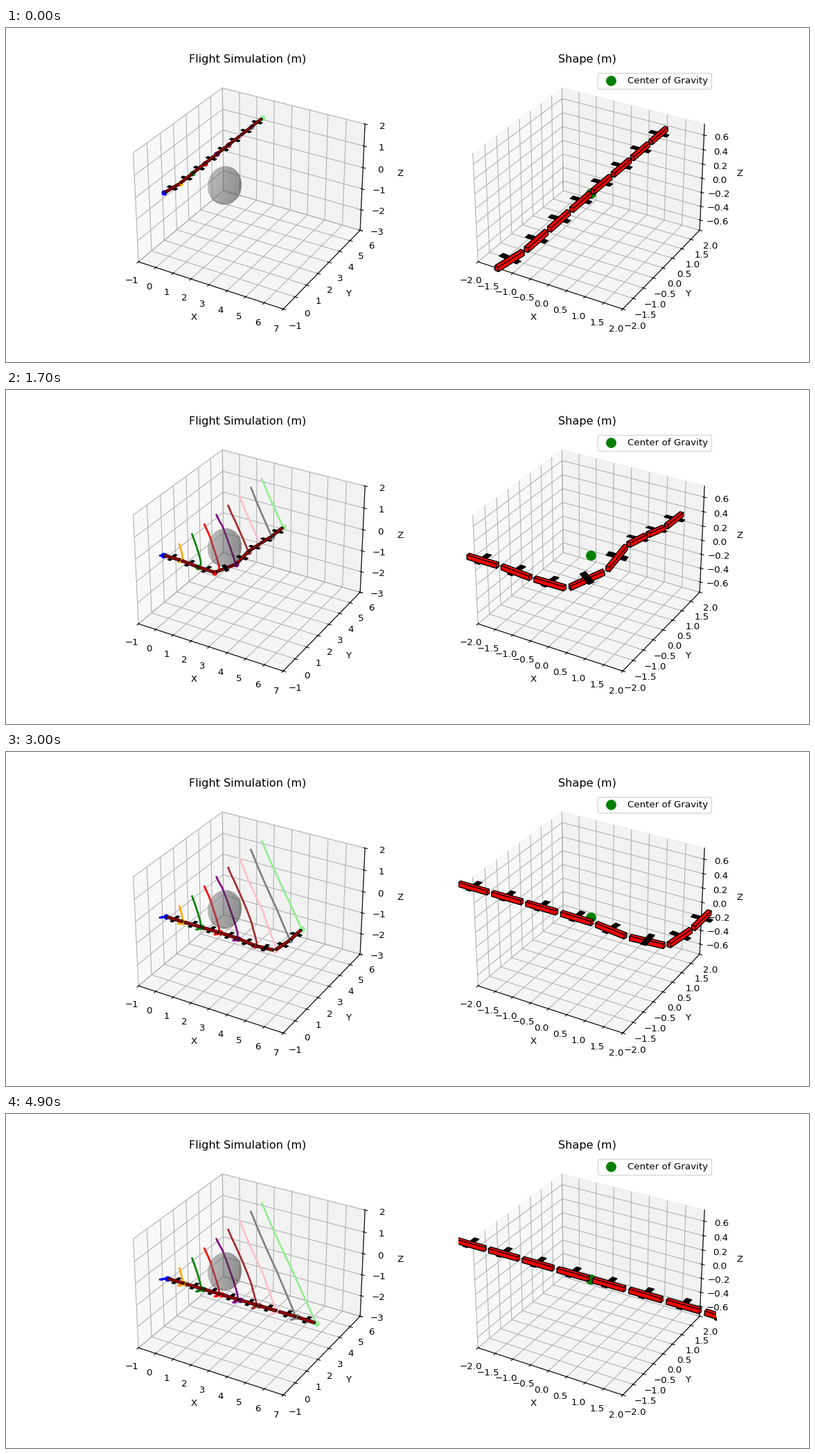
Recreate the animation shown at these times as a matplotlib script. Size 1159x483 px, loop 5 s.

```python
from itertools import product

import numpy as np
import matplotlib.pyplot as plt
from matplotlib.animation import FuncAnimation
from mpl_toolkits.mplot3d.art3d import Poly3DCollection

LINKS = 8
FRAMES = 50
START = -4          # trails begin a little before the first picture
STEP = 5            # frames between the turns of neighbouring links
COLORS = ["blue", "orange", "green", "red", "purple",
          "brown", "pink", "gray", "lightgreen"]
SIGHT = np.array([0.433, -0.75, 1.0])   # towards the viewer


def rise(t, mid, width):
    return 1 / (1 + np.exp(-(t - mid) / width))


def joints(t):
    """Positions of the nine joints at time t (in frames)."""
    # a hump in the chain clears the ball, then flattens out
    i = np.arange(LINKS + 1)
    lift = 0.27 * (rise(t, 3, 1) - rise(t, 21, 1))
    z = lift * np.exp(-(i - 4 - (t - 7) / 10) ** 2 / 2)

    # links turn one after another from 90 to 0 degrees and overshoot a bit
    age = t - STEP * i[:-1]
    yaw = np.radians(90 * (1 - rise(age, 2.4, 1.1))
                     - 9 * np.exp(-((age - 9.5) / 4) ** 2))
    flat = np.sqrt(1 - np.diff(z) ** 2)
    x = np.r_[0, np.cumsum(flat * np.cos(yaw))]
    y = np.r_[0, np.cumsum(flat * np.sin(yaw))]

    # the tail travels on a straight diagonal, so the root gives way
    slack = (flat.sum() - y[-1] - x[-1]) / 2
    return np.column_stack([x + slack, y + slack, z])


def link_axes(p, q):
    """Forward, sideways and up vectors of a link."""
    fwd = (q - p) / np.linalg.norm(q - p)
    side = np.array([fwd[1], -fwd[0], 0])
    side /= np.linalg.norm(side)
    return np.array([fwd, side, np.cross(side, fwd)])


def box(mid, axes, half):
    corners = mid + (np.array(list(product((-1, 1), repeat=3))) * half) @ axes
    grid = corners.reshape(2, 2, 2, 3)
    faces = [np.take(grid, end, axis=k) for k in range(3) for end in (0, 1)]
    return [f.reshape(4, 3)[[0, 1, 3, 2]] for f in faces]


def plate(mid, axes):
    corners = np.array([(-0.07, -0.26, 0.03), (0.07, -0.26, 0.03),
                        (0.07, 0.26, 0.03), (-0.07, 0.26, 0.03)])
    return [mid + corners @ axes]


def place(part, polys, bias=0.0):
    part.set_verts(polys)
    near = max((p @ SIGHT).max() for p in polys)
    part.set_zorder(20 + near + bias)


def add_parts(ax, color, lw):
    parts = [Poly3DCollection([np.zeros((4, 3))], facecolors=color,
                              edgecolors="black", linewidths=lw)
             for _ in range(LINKS)]
    for part in parts:
        ax.add_collection3d(part)
    return parts


def setup(ax, title, xlim, ylim, zlim):
    ax.set(title=title, xlim=xlim, ylim=ylim, zlim=zlim,
           xlabel="X", ylabel="Y", zlabel="Z")


fig = plt.figure(figsize=(12, 5), dpi=96.61)   # 1159 x 483 pixels
flight = fig.add_subplot(121, projection="3d", computed_zorder=False)
shape = fig.add_subplot(122, projection="3d", computed_zorder=False)

u, v = np.meshgrid(np.linspace(0, 2 * np.pi, 30), np.linspace(0, np.pi, 20),
                   indexing="ij")
R = 0.8
flight.plot_surface(1.5 + R * np.cos(u) * np.sin(v),
                    2.5 + R * np.sin(u) * np.sin(v),
                    -0.5 + R * np.cos(v), color="gray", alpha=0.3, zorder=3)

trails = [flight.plot([], [], [], color=c, lw=2, zorder=2)[0] for c in COLORS]
heads = [flight.plot([], [], [], "o", color=c, ms=5, zorder=2.2)[0] for c in COLORS]
shape.scatter([0], [0], [0], color="green", s=100, depthshade=False,
              zorder=20, label="Center of Gravity")
shape.legend(loc="upper right")

bodies = [(ax, add_parts(ax, "black", 1), add_parts(ax, "red", lw))
          for ax, lw in ((flight, 0.6), (shape, 0.9))]

setup(flight, "Flight Simulation (m)", (-1, 7), (-1, 6), (-3, 2))
setup(shape, "Shape (m)", (-2, 2), (-2, 2), (-0.75, 0.75))


def draw(n):
    path = np.array([joints(t) for t in np.arange(START, n + 0.25, 0.5)])
    now = path[-1]
    for k in range(LINKS + 1):
        trails[k].set_data_3d(*path[:, k].T)
        heads[k].set_data_3d(*now[k:k + 1].T)

    center = (now[:-1] + now[1:]).mean(axis=0) / 2
    for ax, plates, rods in bodies:
        pts = now - center if ax is shape else now
        for k in range(LINKS):
            mid = (pts[k] + pts[k + 1]) / 2
            axes = link_axes(pts[k], pts[k + 1])
            place(plates[k], plate(mid, axes))
            place(rods[k], box(mid, axes, (0.43, 0.05, 0.03)), 0.01)
    return []


anim = FuncAnimation(fig, draw, frames=FRAMES, interval=100,
                     repeat=True, repeat_delay=0, blit=False)
plt.show()
```
